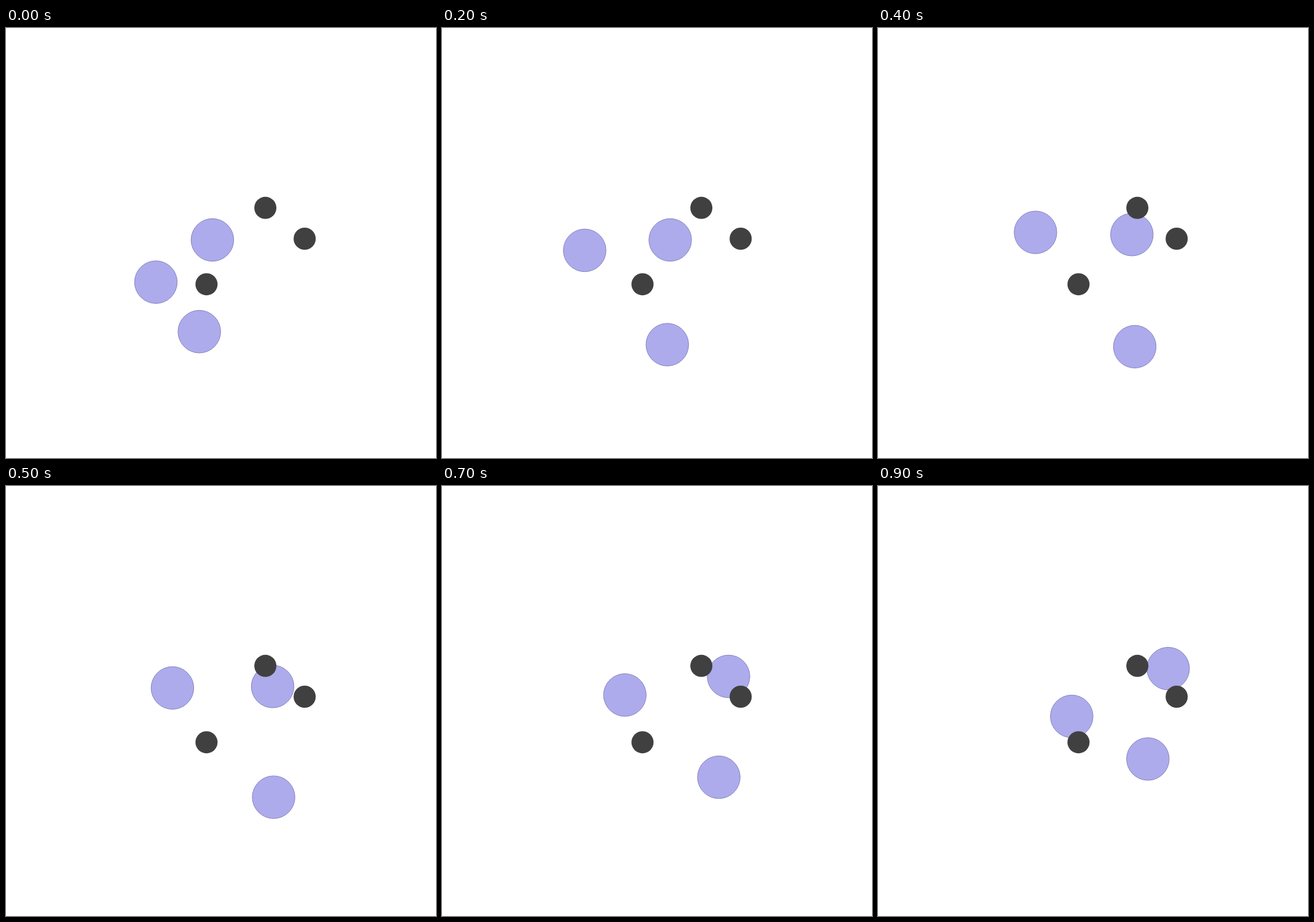
Recreate the animation shown at these times as an HTML page with a canvas. Size 700x700 px, loop 1000 ms.

```html
<!DOCTYPE html>
<html lang="en">
<head>
<meta charset="utf-8">
<title>Circles</title>
<style>
html, body { margin: 0; width: 100%; height: 100%; overflow: hidden; background: #fff; }
canvas { display: block; width: 700px; height: 700px; }
</style>
</head>
<body>
<canvas id="stage" width="700" height="700"></canvas>
<script>
const ctx = document.getElementById('stage').getContext('2d');
const LOOP = 1000, STEP = 100, KEY_GAP = 200;

// Evenly timed key points, joined by a smooth curve
const paths = [
  [[336, 345], [371.5, 345], [413.3, 336.3], [452.3, 316], [474.2, 304.5], [462, 289]],
  [[244, 413.7], [232.3, 362], [256.4, 332.7], [285.3, 331.4], [308, 355], [320, 400.5]],
  [[314.7, 494.3], [366.8, 515.5], [418, 518.8], [447, 490], [447.8, 458.4], [425, 431.6]]
];
const dots = [[422.2, 292.8], [486.2, 343], [326.4, 417.2]];

// Continue a run of three values along its parabola
const extend = (a, b, c) => 3 * a - 3 * b + c;

function spline(v, pos) {
  const i = Math.min(Math.floor(pos), v.length - 2), u = pos - i;
  const b = v[i], c = v[i + 1];
  const a = v[i - 1] ?? extend(b, c, v[i + 2]);
  const d = v[i + 2] ?? extend(c, b, a);
  return b + u / 2 * (c - a + u * (2 * a - 5 * b + 4 * c - d + u * (3 * (b - c) + d - a)));
}

const pointAt = (path, ms) =>
  [0, 1].map(axis => spline(path.map(p => p[axis]), ms / KEY_GAP));

function disc([x, y], r, fill, line) {
  ctx.beginPath();
  ctx.arc(x, y, r, 0, Math.PI * 2);
  ctx.fillStyle = fill;
  ctx.fill();
  if (line) {
    ctx.strokeStyle = line;
    ctx.stroke();
  }
}

function draw(ms) {
  const held = Math.floor(ms % LOOP / STEP) * STEP;
  ctx.fillStyle = '#fff';
  ctx.fillRect(0, 0, 700, 700);
  for (const path of paths) disc(pointAt(path, held), 34.7, '#adabeb', '#8583c0');
  for (const dot of dots) disc(dot, 18, '#404040');
}

let start;
function tick(now) {
  start ??= now;
  draw(Math.max(0, now - start));
  requestAnimationFrame(tick);
}
draw(0);
requestAnimationFrame(tick);
</script>
</body>
</html>
```
